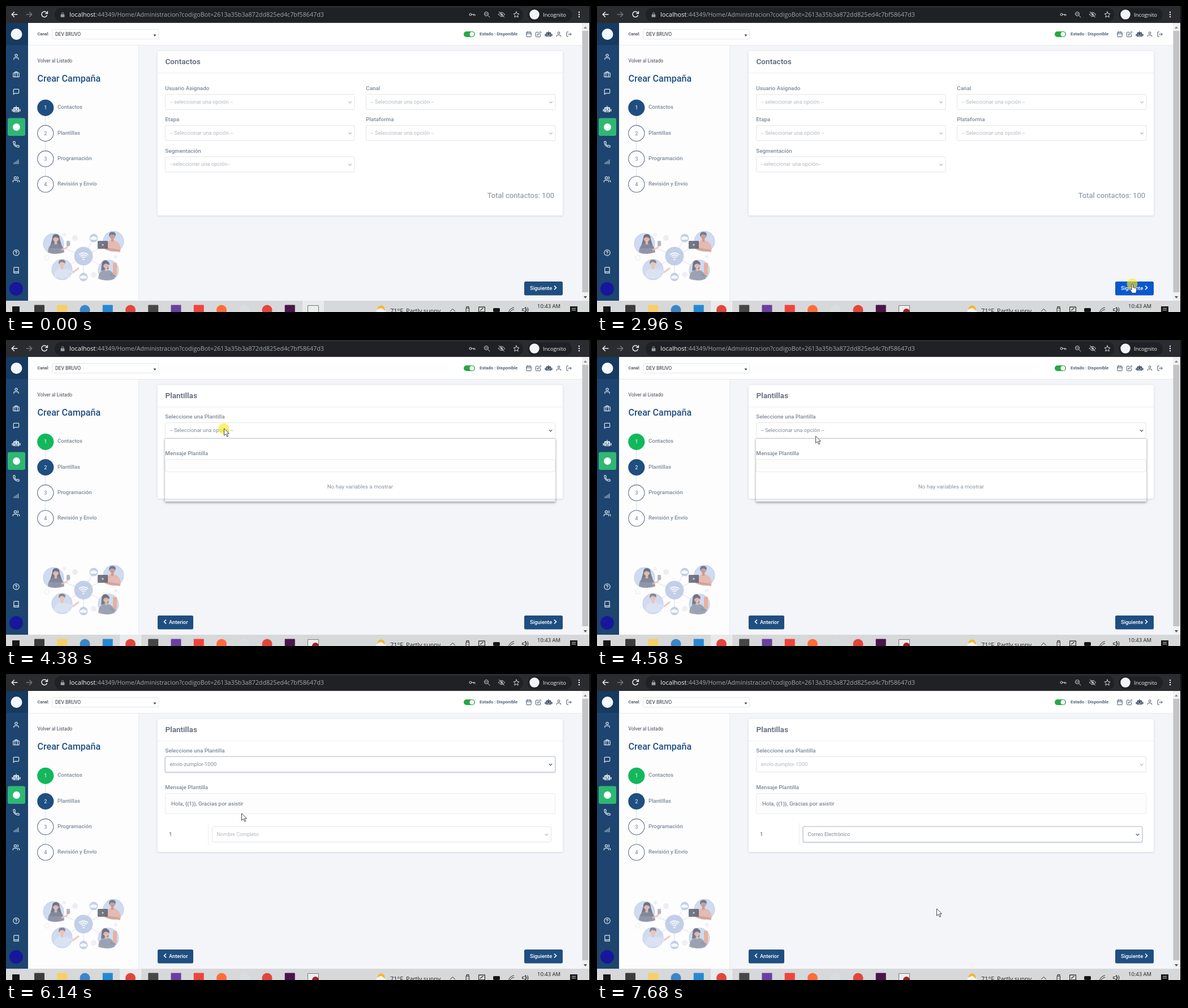
Write an HTML page with a canvas that moves like this. It is 1034 by 542 pixels and loops after 8000 ms.

```html
<!DOCTYPE html>
<html lang="es">
<head>
<meta charset="utf-8">
<title>Crear Campaña</title>
<style>
html, body { margin: 0; width: 100%; height: 100%; overflow: hidden; background: #f4f5f9; }
canvas { display: block; }
</style>
</head>
<body>
<canvas id="stage" width="1034" height="542"></canvas>
<script>
const c = document.getElementById('stage').getContext('2d');
const LOOP = 8000;
const NAVY = '#1f4e80', SLATE = '#7c8998', FAINT = '#b3b8bf', LINE = '#e1e5eb';
const UI = 'Roboto, sans-serif', SYS = '"Open Sans", sans-serif';
const TEMPLATE = 'envio-zumplor-1000';

// Moments at which the interface changes
const AT = { record: 70, hover: 2480, focus: 2880, page: 3100, leave: 3700, hoverList: 4150,
  open: 4350, close: 4860, picked: 4990, filled: 5190, open2: 6750, close2: 7450, picked2: 7550 };
const CLICKS = [[2880, 3040], [4320, 4450], [4810, 4890], [6730, 6850], [7380, 7450]];

// Pointer path: time, x, y
const PATH = [
  [70, 977, 541], [300, 964, 526], [520, 954, 521], [690, 954, 521], [720, 951, 517],
  [960, 951, 517], [1060, 948, 521], [1230, 948, 521], [1660, 723, 410], [1800, 723, 410],
  [2220, 926, 480], [2390, 926, 480], [2620, 946, 492], [3640, 946, 492], [3880, 760, 330],
  [4050, 440, 116], [4180, 385, 157], [4450, 385, 157], [4920, 389, 205], [5390, 396, 247],
  [5760, 396, 247], [5870, 406, 230], [6080, 406, 230], [6140, 416, 247], [6450, 425, 277],
  [6680, 425, 277], [6800, 425, 282], [7300, 430, 325], [7500, 430, 325], [7680, 600, 416]
];

// Line icons on a 24 unit grid
const ICON = {
  user: 'M20 21v-2a4 4 0 0 0-4-4H8a4 4 0 0 0-4 4v2M16 7a4 4 0 1 1-8 0a4 4 0 1 1 8 0',
  bag: 'M4 7h16a2 2 0 0 1 2 2v10a2 2 0 0 1-2 2H4a2 2 0 0 1-2-2V9a2 2 0 0 1 2-2zM16 21V5a2 2 0 0 0-2-2h-4a2 2 0 0 0-2 2v16',
  chat: 'M21 15a2 2 0 0 1-2 2H7l-4 4V5a2 2 0 0 1 2-2h14a2 2 0 0 1 2 2z',
  phone: 'M22 17v3a2 2 0 0 1-2 2A18 18 0 0 1 2 4a2 2 0 0 1 2-2h3l2 5-2 3a16 16 0 0 0 7 7l3-2z',
  bars: 'M3 21v-5M9 21v-9M15 21V8M21 21V3',
  users: 'M17 21v-2a4 4 0 0 0-4-4H5a4 4 0 0 0-4 4v2M13 7a4 4 0 1 1-8 0a4 4 0 1 1 8 0M23 21v-2a4 4 0 0 0-3-3.9M16 3.1a4 4 0 0 1 0 7.8',
  help: 'M22 12a10 10 0 1 1-20 0a10 10 0 1 1 20 0M9 9a3 3 0 0 1 5.8 1c0 2-3 3-3 3M12 17v.5',
  book: 'M4 19.5A2.5 2.5 0 0 1 6.5 17H20M6.5 2H20v20H6.5A2.5 2.5 0 0 1 4 19.5v-15A2.5 2.5 0 0 1 6.5 2z',
  date: 'M5 4h14a2 2 0 0 1 2 2v14a2 2 0 0 1-2 2H5a2 2 0 0 1-2-2V6a2 2 0 0 1 2-2zM16 2v4M8 2v4M3 10h18',
  edit: 'M11 4H4a2 2 0 0 0-2 2v14a2 2 0 0 0 2 2h14a2 2 0 0 0 2-2v-7M18.5 2.5a2 2 0 0 1 3 3L12 15l-4 1 1-4z',
  exit: 'M9 21H5a2 2 0 0 1-2-2V5a2 2 0 0 1 2-2h4M16 17l5-5-5-5M21 12H9',
  robot: 'M11 2h2v4h5a2 2 0 0 1 2 2v12H4V8a2 2 0 0 1 2-2h5zM7 10h3v3H7zM14 10h3v3h-3zM7 16h10v2H7zM0 11h3v7H0zM21 11h3v7h-3z',
  back: 'M21 12H4M11 4l-8 8 8 8',
  next: 'M3 12h17M13 4l8 8-8 8',
  reload: 'M20 15a9 9 0 1 1-1-9l3 3M22 2v7h-7',
  lock: 'M4 10h3V7a5 5 0 0 1 10 0v3h3v12H4zM9 10h6V7a3 3 0 0 0-6 0z',
  key: 'M10 12a4 4 0 1 1-8 0a4 4 0 1 1 8 0M10 12h12v4M17 12v4',
  zoom: 'M17 10a7 7 0 1 1-14 0a7 7 0 1 1 14 0M15.5 15.5L22 22M7 10h6',
  eye: 'M1 12q11-15 22 0q-11 15-22 0M15 12a3 3 0 1 1-6 0a3 3 0 1 1 6 0M3 2l18 20',
  star: 'M12 2l3 7 7 .7-5.3 4.8 1.6 7.5-6.3-4-6.3 4 1.6-7.5L2 9.7 9 9z',
  up: 'M4 17l8-8 8 8',
  cam: 'M7 6h10v16H7zM8 6V1h8v5M12 14v.5',
  screen: 'M2 3h20v16H2zM7 23h10M7 14l9-7',
  pen: 'M3 21q2-13 18-17M8 21q2-8 13-10',
  sound: 'M2 9h5l6-6v18l-6-6H2zM16 8q4 4 0 8M19 4q7 8 0 16'
};
for (const k in ICON) ICON[k] = new Path2D(ICON[k]);

function box(x, y, w, h, fill, r = 0, stroke) {
  c.beginPath();
  c.roundRect(x, y, w, h, r);
  if (fill) { c.fillStyle = fill; c.fill(); }
  if (stroke) { c.strokeStyle = stroke; c.lineWidth = 1; c.stroke(); }
}
function dot(x, y, r, fill, stroke) {
  c.beginPath();
  c.arc(x, y, r, 0, 7);
  if (fill) { c.fillStyle = fill; c.fill(); }
  if (stroke) { c.strokeStyle = stroke; c.lineWidth = 1.1; c.stroke(); }
}
function line(color, width, ...p) {
  c.beginPath();
  for (let i = 0; i < p.length; i += 2) c.lineTo(p[i], p[i + 1]);
  c.strokeStyle = color;
  c.lineWidth = width;
  c.stroke();
}
function text(s, x, y, size, color, weight = 400, align = 'left', font = UI) {
  c.font = `${weight} ${size}px ${font}`;
  c.textAlign = align;
  c.fillStyle = color;
  c.fillText(s, x, y);
}
function icon(name, x, y, size, color, filled, width = 2) {
  c.save();
  c.translate(x - size / 2, y - size / 2);
  c.scale(size / 24, size / 24);
  c.lineJoin = c.lineCap = 'round';
  c.lineWidth = width;
  c.fillStyle = c.strokeStyle = color;
  if (filled) c.fill(ICON[name], 'evenodd');
  else c.stroke(ICON[name]);
  c.restore();
}
function shape(d, x, y, fill, stroke) {
  c.save();
  c.translate(x, y);
  const p = new Path2D(d);
  c.fillStyle = fill;
  c.fill(p);
  if (stroke) { c.strokeStyle = stroke; c.lineWidth = 0.9; c.lineJoin = 'round'; c.stroke(p); }
  c.restore();
}
function shadowed(blur, color, draw) {
  c.save();
  c.shadowBlur = blur;
  c.shadowColor = color;
  c.shadowOffsetY = 1;
  draw();
  c.restore();
}

function browserBar() {
  box(0, 0, 1034, 30, '#2b2c30');
  box(86, 3, 828, 25, '#202124', 12);
  box(922, 4, 78, 23, '#202124', 11);
  icon('back', 15, 15, 13, '#f1f3f4', false, 2.6);
  icon('next', 41, 15, 13, '#75777b', false, 2.6);
  icon('reload', 68, 15, 13, '#f1f3f4', false, 2.6);
  icon('lock', 100, 15.5, 10, '#9aa0a6', true);
  text('localhost', 112, 19, 11.1, '#f1f3f4', 500, 'left', SYS);
  text(':44349/Home/Administracion?codigoBot=2613a35b3a872dd825ed4c7bf58647d3', 159, 19, 10.72, '#a2a6ab', 400, 'left', SYS);
  ['key', 'zoom', 'eye', 'star'].forEach((n, i) => icon(n, 824 + 26 * i, 15, 12, '#dadce0'));
  dot(934, 15, 8.7, '#f1f3f4');
  text('Incognito', 949, 18.5, 9.45, '#f1f3f4', 500, 'left', SYS);
  for (const y of [11, 15, 19]) dot(1013, y, 1.2, '#f1f3f4');
}

function sidebar() {
  box(0, 30, 39, 492, '#1d456f');
  box(0, 30, 39, 39, '#163a60');
  dot(18.5, 50, 10, '#f4f8fb');
  box(3, 198.5, 31, 31.5, '#2eb872', 3);
  dot(18.5, 214.5, 6.5, '#fff');
  const items = { user: 90, bag: 121, chat: 152, robot: 183, phone: 245, bars: 276, users: 307, help: 437, book: 468 };
  for (const n in items) {
    const size = { bars: 10, robot: 15 }[n] || 12.5;
    icon(n, 18, items[n], size, '#dfe7ef', n === 'robot', 2.3);
  }
  dot(18, 501, 12, '#17179c');
}

function header() {
  box(39, 30, 979, 39, '#fff');
  text('Canal:', 55.5, 52, 7.3, '#3c4651', 500);
  box(81.5, 41.5, 188, 17, '#fff', 2, '#e3e6ea');
  text('DEV BRUVO', 87, 52.5, 8.5, '#2c3138');
  shape('M0 0h5l-2.5 3.5z', 260.5, 50.5, '#444');
  box(809, 45, 20, 10, '#27a745', 5);
  dot(823.5, 50, 4, '#fff');
  text('Estado : Disponible', 837, 52, 7.85, '#3c5068', 500);
  const row = { date: 924, edit: 941, robot: 959, user: 977, exit: 995 };
  for (const n in row) icon(n, row[n], 50, n === 'robot' ? 13 : 11, '#33475f', n === 'robot');
}

function person(x, y, shirt, hair, skin) {
  c.save();
  c.translate(x, y);
  c.scale(1.15, 1.15);
  shape('M-12 21Q-12 8 0 7Q12 8 13 21Q0 26-12 21z', 0, 0, shirt);
  box(-2, 2, 4, 7, skin);
  dot(0, 0, 4.6, skin);
  shape('M-5 1Q-6-6 0-6Q6-6 5 0Q1-3-2-2z', 0, 0, hair);
  c.restore();
}
function illustration() {
  const pale = '#c9d6ed', mid = '#b9c7e3', dark = '#666b80', skin = '#ecc1b3';
  c.save();
  c.globalAlpha = 0.86;
  dot(122, 411, 5, '#e8eaef');
  dot(103, 405, 3, '#eceef2');
  dot(72, 446, 4, null, '#e6e8ee');
  dot(155, 476, 5, '#eceef2');
  dot(194, 444, 3, '#eceef2');
  for (const [x, y] of [[84, 421], [189, 418], [99, 467], [182, 468], [155, 411], [137, 480]]) line('#d3dae8', 1, 137, 443, x, y);
  for (const [x, y] of [[84, 421], [190, 417], [99, 467], [181, 468]]) dot(x, y, 18, pale, '#bfcce4');
  shape('M-6 0Q-6-7 0-7Q7-7 7 2L12 18H-11z', 88, 411, dark);
  person(88, 412, '#858a9b', dark, skin);
  line(skin, 3, 98, 432, 107, 428, 113, 420);
  box(107, 416, 6, 9, '#a9adb8', 1);
  person(188, 407, '#e7b5a8', '#60709a', '#c99786');
  line('#cf9f8f', 4, 178, 430, 202, 434);
  box(162, 416, 18, 14, '#5d6272', 1);
  dot(171, 423, 1.5, '#e8eaf0');
  person(99, 456, '#dce4f3', '#777b8b', skin);
  line('#dce4f3', 5, 108, 469, 119, 472);
  line(skin, 3, 118, 472, 129, 464);
  shape('M-6 2Q-6-7 1-7Q8-6 6 9L-7 12z', 175, 457, dark);
  person(177, 459, '#9299a9', dark, skin);
  line('#9299a9', 4, 184, 476, 194, 479);
  box(189, 455, 7, 21, '#e9aa91', 1);
  dot(137, 443, 16.5, mid);
  for (const r of [4.5, 8, 11.5]) {
    c.beginPath();
    c.arc(137, 449, r, -2.35, -0.8);
    c.strokeStyle = '#fff';
    c.lineWidth = 2.1;
    c.stroke();
  }
  dot(137, 449, 1.6, '#fff');
  for (const [x, y] of [[155, 411], [137, 480]]) {
    dot(x, y, 7.5, mid);
    shape('M-4 3a2.5 2.5 0 0 1 1-5a3 3 0 0 1 5 0a2.5 2.5 0 0 1 2 5z', x, y, '#fff');
  }
  c.restore();
}

function steps(second) {
  box(39, 70, 195, 452, '#fdfdfe');
  line('#e9ebf0', 1, 234.5, 70, 234.5, 522);
  text('Volver al Listado', 55.5, 100, 8.4, '#444b55');
  text('Crear Campaña', 55.5, 134, 16.1, NAVY, 500);
  line('#dde1e7', 1, 69.5, 180, 69.5, 315);
  ['Contactos', 'Plantillas', 'Programación', 'Revisión y Envío'].forEach((s, i) => {
    const y = 180.3 + i * 45.2, now = i === +second, done = i < second, on = now || done;
    dot(69.8, y, on ? 14.6 : 14.1, done ? '#12b85b' : now ? NAVY : '#fdfdfe', on ? null : '#5f738c');
    text(i + 1, 69.8, y + 3, 9.3, on ? '#fff' : '#6d7f96', 400, 'center');
    text(s, 91, y + 2.1, 9.6, SLATE, 500);
  });
  illustration();
}

function chevron(x, y, color, dx = 2.7, dy = 2.7) {
  line(color, 1.3, x - dx, y - dy / 2, x, y + dy / 2, x + dx, y - dy / 2);
}
function select(x, y, w, value, { size = 9.4, active, ring } = {}) {
  if (ring) {
    shadowed(2, 'rgba(90,105,130,.2)', () => box(x - 0.5, y - 0.5, w + 1, 29, '#c9d0db', 3));
    box(x + 1, y + 1, w - 2, 26, '#fff', 2);
  } else box(x + 0.5, y + 0.5, w - 1, 27, '#fff', 2, LINE);
  text(value, x + 8.5, y + 16.5, size, active ? '#808b98' : FAINT);
  chevron(x + w - 8.5, y + 14.5, active ? '#4d545e' : '#b0b5bc');
}
function popup(x, y, w, h) {
  // Shadow only, the page stays visible inside
  c.save();
  c.beginPath();
  c.rect(0, y, 1034, 542);
  c.rect(x, y, w, h);
  c.clip('evenodd');
  shadowed(4, 'rgba(0,0,0,.42)', () => box(x, y, w, h, '#999'));
  c.restore();
  line('#c3c6cb', 0.8, x, y + 0.5, x + w, y + 0.5);
}
function card(title, h) {
  shadowed(4, 'rgba(50,65,95,.16)', () => box(268, 80, 716, h, '#fff', 2));
  text(title, 281.5, 103, 13.6, '#556070', 500);
  line('#eceef2', 1, 268, 118.5, 984, 118.5);
}
const label = (s, x, y) => text(s, x, y, 9.85, SLATE, 500);

function contacts() {
  card('Contactos', 291);
  const fields = [
    ['Usuario Asignado', 281, 156, '-- seleccionar una opción --'],
    ['Canal', 636, 156, '-- Seleccionar una opción --'],
    ['Etapa', 281, 211, '-- Seleccionar una opción --'],
    ['Plataforma', 636, 211, '-- Seleccionar una opción --'],
    ['Segmentación', 281, 266.5, '--seleccionar una opción--']
  ];
  for (const [name, x, y, hint] of fields) {
    label(name, x + 0.3, y - 7);
    select(x, y, 335.5, hint);
  }
  text('Total contactos: 100', 969, 339.5, 13, '#808b99', 400, 'right');
}

function templates(t) {
  const filled = t >= AT.filled, focus = t >= AT.close && t < AT.open2;
  card('Plantillas', filled ? 235 : 201);
  label('Seleccione una Plantilla', 281.3, 139);
  select(281, 146, 690, t < AT.picked ? '-- Seleccionar una opción --' : TEMPLATE,
    { active: t >= AT.hoverList && t < AT.open2, ring: focus });
  label('Mensaje Plantilla', 281.3, 204);
  box(281.5, 211.5, 689, filled ? 36 : 22, '#fdfdfe', 2, '#e8ebef');
  if (filled) {
    text('Hola, {{1}}, Gracias por asistir', 292, 232.5, 9.85, '#626c79');
    text('1', 288, 287, 9.8, '#8c7462', 500);
    line('#eaedf1', 1, 357.5, 264, 357.5, 303);
    select(364, 270, 600, t < AT.picked2 ? 'Nombre Completo' : 'Correo Electrónico',
      { size: 9.1, active: t >= AT.open2, ring: t >= AT.close2 });
  } else text('No hay variables a mostrar', 626, 263, 9.8, '#88939f', 400, 'center');
  if (t >= AT.open && t < AT.close) popup(281, 174, 690, 112.5);
  if (t >= AT.open2 && t < AT.close2) popup(364, 298, 600, 113);
  button(268, 63);
  text('Anterior', 288, 502.5, 9.3, '#fff', 500);
  line('#fff', 1.7, 283, 495.5, 279.5, 499, 283, 502.5);
}

function button(x, w, hover) {
  box(x, 488, w, 24.5, hover ? '#0b57cd' : NAVY, 2.5);
}

function taskbar(t) {
  box(0, 522, 1034, 20, '#d7d8d9');
  const focused = t >= AT.focus;
  box(focused ? 201 : 524, 522, 38, 20, '#e9eaeb');
  if (focused) line('#f2f2f2', 1, 238.5, 522, 238.5, 542);
  box(11, 532, 13, 10, '#161616');
  const apps = ['#3c3c3c', '#f7cf66', '#3a86c8', '#2489d3', '#e2463a', '#474747', '#6a3fa0', '#ef443b', '#ff6c37', '#d9dde1', '#e2463a', '#4a154b'];
  apps.forEach((color, i) => {
    const x = 59 + 40.25 * i;
    if ([2, 4, 8, 9, 10].includes(i)) dot(x, 538.5, 9, color);
    else box(x - 9, 529.5, 18, 14, color, 1);
  });
  box(533.5, 530.5, 19, 13, '#eceded', 0, '#77797c');
  if (t >= AT.record) dot(547, 542, 6, '#a51f24');
  dot(663, 537, 6.5, '#f7b526');
  shape('M-9 7a4 4 0 0 1 3-6a6 6 0 0 1 10 2a4 4 0 0 1 4 4z', 664, 536, '#eef3f8');
  text('71°F', 679, 543.5, 11, '#222', 400, 'left', SYS);
  text('Partly sunny', 707, 543.5, 10.6, '#222', 400, 'left', SYS);
  icon('up', 789.5, 538, 12, '#222');
  icon('cam', 816, 538, 12, '#222');
  icon('screen', 841, 538, 13, '#222');
  box(861.5, 535.5, 11, 6, '#111', 1, '#222');
  icon('pen', 893, 538, 12, '#222');
  icon('sound', 918, 538, 12, '#222');
  text('10:43 AM', 939, 535, 9.45, '#1d1d1d', 400, 'left', SYS);
  shape('M0 0h13v10H8l-3 3v-3H0z', 997, 532, '#161616');
  line('#d7d8d9', 1, 1000, 535.5, 1007, 535.5);
  line('#d7d8d9', 1, 1000, 538.5, 1007, 538.5);
}

function scrollbar() {
  box(1018, 30, 13, 492, '#f1f1f1');
  box(1018.5, 44, 11, 463, '#c3c4c6');
  shape('M0 4h6l-3-4z', 1021, 36, '#8a8a8a');
  shape('M0 0h6l-3 4z', 1021, 514, '#505050');
}

function pointer(t) {
  if (t < PATH[0][0]) return;
  let i = 0;
  while (i < PATH.length - 2 && t >= PATH[i + 1][0]) i++;
  const [t0, x0, y0] = PATH[i], [t1, x1, y1] = PATH[i + 1];
  const k = Math.min(1, (t - t0) / (t1 - t0));
  const x = x0 + (x1 - x0) * k, y = y0 + (y1 - y0) * k;
  if (CLICKS.some(([a, b]) => t >= a && t < b)) dot(x, y, 9.5, 'rgba(250,236,20,.64)');
  if (t >= AT.hover && t < AT.leave)
    shape('M-1 1Q0-1 1.5 1V6L6 7Q8 7.5 8 9.5L6.5 16H0L-4 10Q-4 8-1 10z', x, y + 0.5, '#fff', '#333');
  else shape('M0 0V12.5L3 9.8L5.2 14.5L7.2 13.6L5 9H9z', x + 0.5, y - 0.2, '#fff', '#333');
}

function draw(t) {
  const second = t >= AT.page;
  box(0, 0, 1034, 542, '#f4f5f9');
  browserBar();
  header();
  line('#e6e8ed', 1, 39, 69.5, 1018, 69.5);
  steps(second);
  sidebar();
  if (second) templates(t);
  else contacts();
  button(916, 68, t >= AT.hover && t < AT.leave);
  text('Siguiente', 926, 502.5, 9.35, '#fff', 500);
  line('#fff', 1.7, 969, 495.5, 972.5, 499, 969, 502.5);
  scrollbar();
  taskbar(t);
  box(1031, 0, 3, 542, '#111');
  pointer(t);
}

const start = performance.now();
function tick() {
  draw((performance.now() - start) % LOOP);
  requestAnimationFrame(tick);
}
tick();
</script>
</body>
</html>
```
